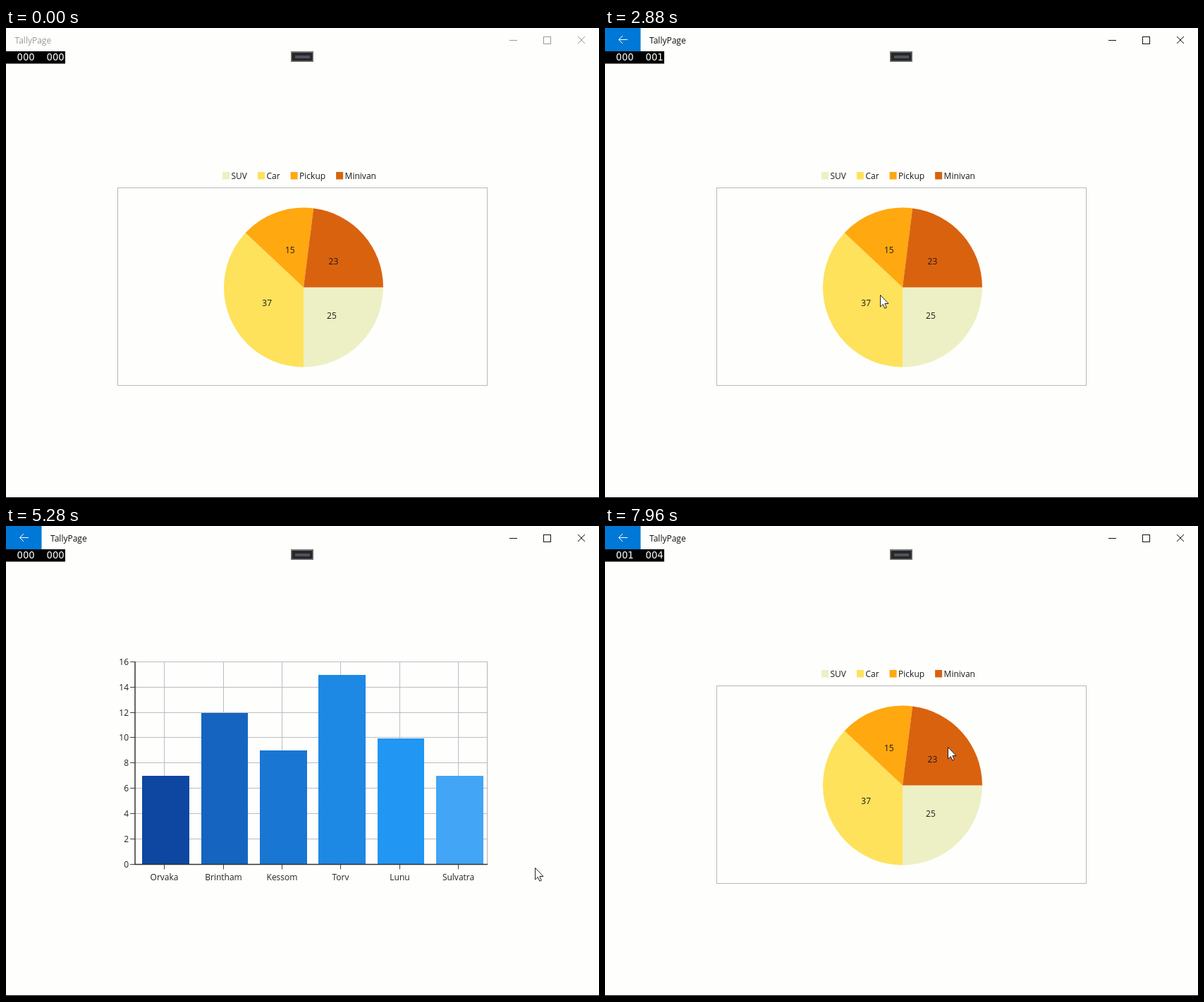
Animation, 841 px wide and 666 px high, one loop 8000 ms. Source, as an HTML page with a canvas:

```html
<!DOCTYPE html>
<html lang="en">
<head>
<meta charset="utf-8">
<title>Chart window</title>
<style>
  html, body { margin: 0; width: 100%; height: 100%; overflow: hidden; background: #fefefc; }
  canvas { display: block; }
</style>
</head>
<body>
<canvas id="stage" width="841" height="666"></canvas>
<script>
const ctx = document.getElementById('stage').getContext('2d');
const LOOP = 8000;
const MOVE = 640;
const UI = '12px "Open Sans", "Noto Sans", sans-serif';
const DIGITS = '13.2px "DejaVu Sans", sans-serif';

const slices = [
  ['SUV', 25, '#edf0c4'],
  ['Car', 37, '#fee25c'],
  ['Pickup', 15, '#ffa810'],
  ['Minivan', 23, '#d9620f'],
];
const bars = [
  ['Orvaka', 7, '#0d47a1'],
  ['Brintham', 12, '#1565c0'],
  ['Kessom', 9, '#1976d2'],
  ['Torv', 15, '#1e88e5'],
  ['Lunu', 10, '#2196f3'],
  ['Sulvatra', 7, '#42a5f5'],
];

// Where the pointer rests: time of arrival, x, y
const stops = [
  [400, 720, 492], [1600, 309, 381], [2760, 390, 378], [3760, 650, 474], [4520, 131, 90],
  [4640, 24, 7], [5200, 750, 484], [6080, 32, 16], [6800, 430, 260], [7600, 486, 313],
];

function rect(x, y, w, h, color) {
  ctx.fillStyle = color;
  ctx.fillRect(x, y, w, h);
}

function line(color, x0, y0, x1, y1, width = 1) {
  ctx.beginPath();
  ctx.moveTo(x0, y0);
  ctx.lineTo(x1, y1);
  ctx.strokeStyle = color;
  ctx.lineWidth = width;
  ctx.stroke();
}

function frame(x, y, w, h, color) {
  ctx.strokeStyle = color;
  ctx.lineWidth = 1;
  ctx.strokeRect(x + 0.5, y + 0.5, w, h);
}

function text(str, x, y, color = '#1a1a1a', align = 'left', font = UI) {
  ctx.font = font;
  ctx.textAlign = align;
  ctx.fillStyle = color;
  ctx.fillText(str, x, y);
}

function drawTitleBar(active, back, hover) {
  const ink = active ? '#111' : '#999';
  if (back) {
    rect(0, 0, 50.5, 33, hover ? '#2a8bdd' : '#0078d7');
    line('#fff', 32, 16.5, 19.5, 16.5);
    line('#fff', 25, 11, 19.5, 16.5);
    line('#fff', 25, 22, 19.5, 16.5);
  }
  text('TallyPage', back ? 63 : 12.5, 21.5, ink);
  line(ink, 714, 17.5, 725, 17.5);
  frame(762, 12, 10, 10, ink);
  line(ink, 811, 12, 821, 22);
  line(ink, 821, 12, 811, 22);
}

function drawOverlay(left, right) {
  rect(0, 33, 84, 17.5, '#000');
  text(left, 15.5, 46, '#fff', 'left', DIGITS);
  text(right, 57.5, 46, '#fff', 'left', DIGITS);
  rect(404, 33, 32, 15, '#77776f');
  rect(405.5, 35, 29, 11.5, '#25272c');
  rect(410, 39, 21, 4, '#50535a');
}

function drawPie() {
  const cx = 422, cy = 367.5, r = 113;
  let angle = 0, x = 307;
  frame(158, 226, 524, 280, '#b8b8bc');
  for (const [name, value, color] of slices) {
    const sweep = value / 100 * Math.PI * 2;
    ctx.beginPath();
    ctx.moveTo(cx, cy);
    ctx.arc(cx, cy, r, angle, angle + sweep);
    ctx.fillStyle = color;
    ctx.fill();
    const mid = angle + sweep / 2;
    text(value, cx + Math.cos(mid) * r / 2, cy + Math.sin(mid) * r / 2 + 4.5, '#1a1a1a', 'center');
    angle += sweep;

    rect(x, 204, 10, 10.5, color);
    text(name, x + 12.5, 214);
    x += 12.5 + ctx.measureText(name).width + 15;
  }
}

function drawBars() {
  const left = 183, right = 683, top = 192, base = 479.4;
  const unit = 17.95, step = (right - left) / bars.length;
  for (let v = 0; v <= 16; v += 2) {
    const y = Math.floor(base - v * unit) + 0.5;
    line('#bcbcc6', left, y, right, y);
    line('#444', left - 7, y, left, y);
    text(v, left - 9, y + 4, '#222', 'right');
  }
  line('#b4b4b8', right - 0.5, top, right - 0.5, base);
  bars.forEach(([name, value, color], i) => {
    const center = Math.floor(left + (i + 0.5) * step) + 0.5;
    const x = Math.round(left + 10.2 + i * step), end = Math.round(left + 76.9 + i * step);
    const y = Math.round(base + 0.6 - value * unit);
    line('#bcbcc6', center, top, center, base);
    rect(x, y, end - x, base - y, color);
    line('#444', center, base, center, base + 7);
    text(name, center, 501.5, '#222', 'center');
  });
  line('#333', left, top, left, 480, 1.5);
  line('#333', left - 1, base, right, base, 1.5);
}

function pointerAt(t) {
  const next = stops.findIndex(stop => stop[0] > t);
  if (next < 1) return stops.at(-1).slice(1);
  const [t0, x0, y0] = stops[next - 1], [t1, x1, y1] = stops[next];
  const span = Math.min(MOVE, t1 - t0);
  const k = Math.max(0, 1 - (t1 - t) / span);
  const eased = k * k * (3 - 2 * k);
  return [x0 + (x1 - x0) * eased, y0 + (y1 - y0) * eased];
}

function drawPointer(t) {
  ctx.save();
  ctx.translate(...pointerAt(t));
  const shape = new Path2D('M.5 .5V17l3.8-3.5 2.5 5.7 2.5-1.1-2.4-5.6H12Z');
  ctx.fillStyle = '#fff';
  ctx.fill(shape);
  ctx.strokeStyle = '#222';
  ctx.lineWidth = 1;
  ctx.stroke(shape);
  ctx.restore();
}

function draw(t) {
  const within = (a, b) => t >= a && t < b;
  rect(0, 0, 841, 666, '#fefefc');
  rect(0, 665, 841, 1, '#000');
  drawTitleBar(t >= 760, within(2880, 6120) || t >= 7920, within(4560, 4720) || within(6000, 6120));
  drawOverlay(t >= 6280 ? '001' : '000', t >= 6280 ? '004' : within(2600, 3760) ? '001' : '000');
  if (within(2960, 6240)) drawBars(); else drawPie();
  if (t >= stops[0][0]) drawPointer(t);
}

const start = performance.now();
function tick() {
  draw((performance.now() - start) % LOOP);
  requestAnimationFrame(tick);
}
tick();
</script>
</body>
</html>
```
